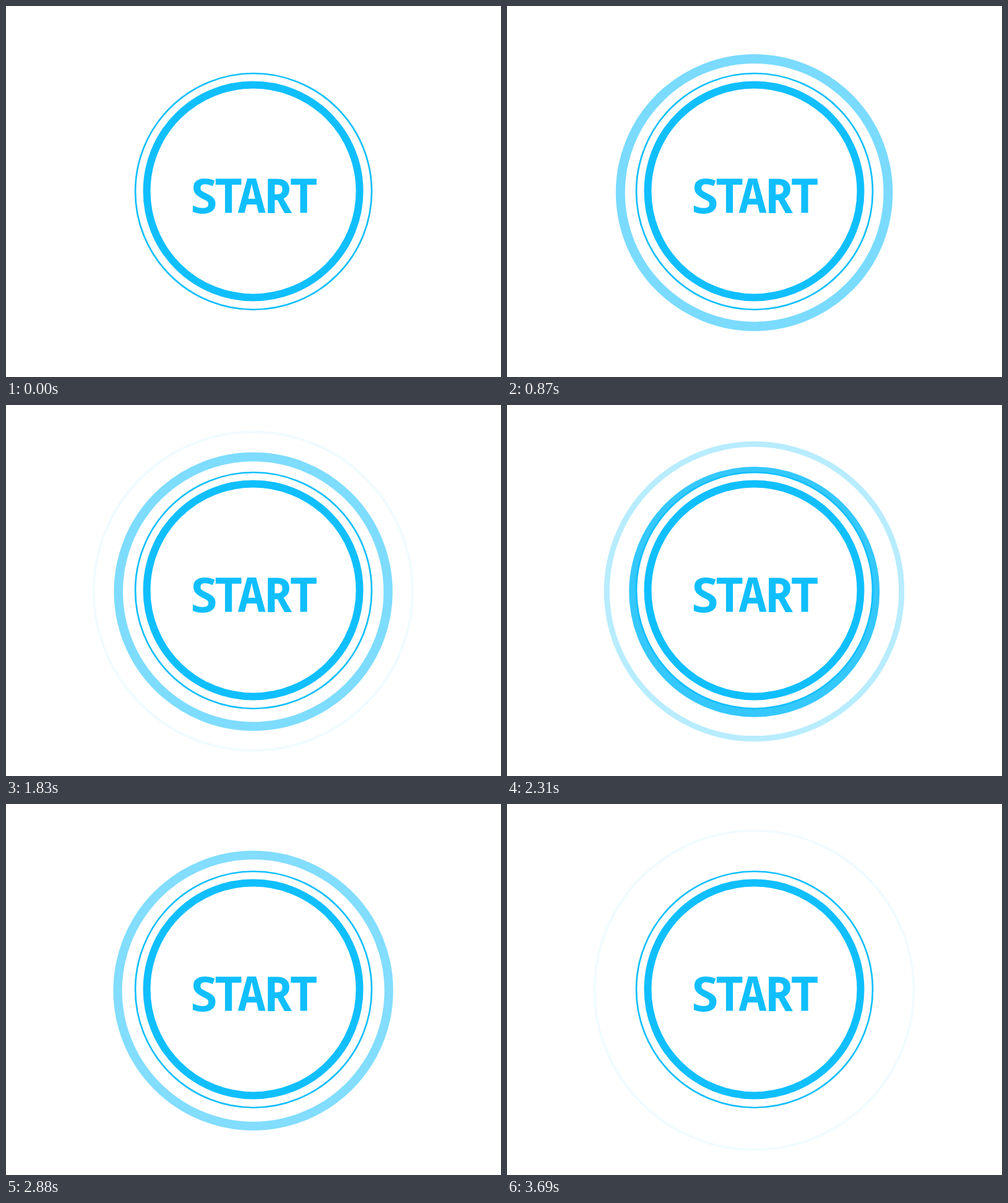
Recreate the animation shown at these times as an HTML page. Size 800 px wide and 600 px high, loop 4.32 s.

```html
<!DOCTYPE html>
<html lang="en">
<head>
<meta charset="utf-8">
<title>Start button</title>
<style>
  html, body { margin: 0; width: 100%; height: 100%; overflow: hidden; background: #fff; }
  svg { display: block; width: 800px; height: 600px; }
  circle { fill: none; stroke: #10bfff; }
  #button .plate { fill: #fff; }
  text {
    font: 600 77px "Noto Sans Mono", "DejaVu Sans Mono", monospace;
    text-anchor: middle;
    fill: #10bfff;
  }
</style>
</head>
<body>
<svg viewBox="0 0 800 600">
  <g id="waves"></g>
  <g id="button">
    <circle class="plate" cx="400" cy="300" r="191" stroke-width="2.7"/>
    <circle cx="399.5" cy="299.5" r="172" stroke-width="12"/>
    <text x="319.5 359.5 397 440 481" y="334.5">START</text>
  </g>
</svg>
<script>
  const LOOP = 4320, STEP = 30, HOLD = 3690;

  // Each wave grows out from behind the button, thinning and fading.
  const waves = [
    { start: 0, length: 1950 },
    { start: 910, length: 1980 },
    { start: 2045, length: 1745 }
  ];

  const mix = (a, b, p) => a + (b - a) * p;
  const set = (el, attrs) => {
    for (const key in attrs) el.setAttribute(key, attrs[key]);
  };

  const layer = document.getElementById("waves");
  for (const wave of waves) {
    wave.el = document.createElementNS("http://www.w3.org/2000/svg", "circle");
    layer.append(wave.el);
  }

  function draw(time) {
    const t = Math.min(Math.floor(time / STEP) * STEP, HOLD);
    for (const { start, length, el } of waves) {
      const p = (t - start) / length;
      const visible = p > 0 && p < 1;
      el.style.display = visible ? "" : "none";
      if (!visible) continue;
      const width = mix(25, 2.5, p);
      set(el, {
        cx: mix(399.8, 399.4, p),
        cy: mix(302.5, 301, p),
        r: mix(191.5, 264, p) - width / 2,
        "stroke-width": width,
        "stroke-opacity": 1 - p
      });
    }
  }

  const begin = performance.now();
  function tick() {
    draw((performance.now() - begin) % LOOP);
    requestAnimationFrame(tick);
  }
  tick();
</script>
</body>
</html>
```
